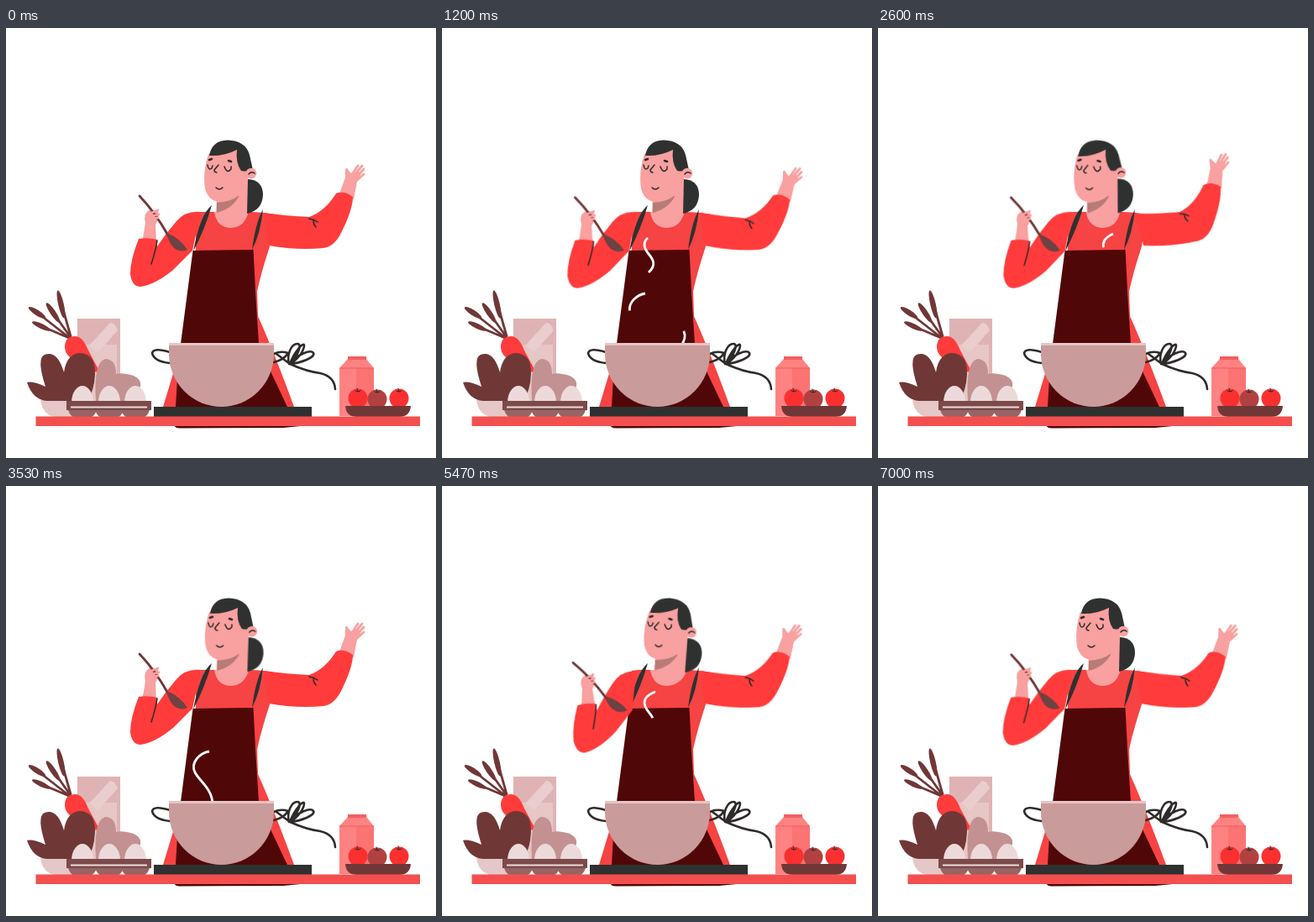
Animation of 512 by 512 pixels, one loop 7.03 s. Source, as an HTML page without scripts:

```html
<!DOCTYPE html>
<html lang="en">
<head>
<meta charset="utf-8">
<title>Cooking</title>
<style>
html, body { margin: 0; width: 100%; height: 100%; overflow: hidden; background: #fff; }
svg { display: block; width: 100%; height: 100%; }

.red { fill: #ff3b3b; }
.dress { fill: #f64343; }
.skin { fill: #f9a0a0; }
.ink { fill: #2f3130; }
.plum { fill: #703737; }
.apron { fill: #500708; }
.line, .finger, .stem { fill: none; stroke-linecap: round; stroke-linejoin: round; }
.line { stroke: #2f2b2b; stroke-width: 1.5; }
.bold { stroke-width: 2.6; }
.fine { stroke-width: 1; }
.finger { stroke: #f9a0a0; stroke-width: 2.8; }
.stem { stroke: #703737; stroke-width: 2.8; }

.head, .spoon, .wave { animation: 7.03s cubic-bezier(.37, 0, .63, 1) infinite; }
.head { transform-origin: 268px 267px; animation-name: sway; }
.spoon { transform-origin: 240px 229px; animation-name: stir; }
.wave { transform-origin: 315px 235px; animation-name: wave; }

@keyframes sway {
  0%, 3.84% { transform: rotate(0deg); }
  9.53% { transform: rotate(-2.9deg); }
  24.6% { transform: rotate(2.9deg); }
  41.96% { transform: rotate(-2.9deg); }
  56.9% { transform: rotate(2.9deg); }
  68.4% { transform: rotate(-1.6deg); }
  77.8% { transform: rotate(2.9deg); }
  90.3% { transform: rotate(-2deg); }
  99.57%, 100% { transform: rotate(0deg); }
}
@keyframes stir {
  0%, 3.84%, 18.92%, 34.85%, 50.2%, 66.43%, 85.3%, 100% { transform: rotate(0deg); }
  12.2%, 27.28%, 42.5%, 58.3%, 77.8%, 92.5% { transform: rotate(-7.2deg); }
  99.57% { transform: rotate(-.6deg); }
}
@keyframes wave {
  0%, 3.84%, 50.2%, 100% { transform: rotate(0deg); }
  9.53% { transform: rotate(-9.2deg); }
  17.8% { transform: rotate(2deg); }
  32.1%, 58.3%, 88.9% { transform: rotate(-9deg); }
  66.43% { transform: rotate(2.3deg); }
  72.1% { transform: rotate(-5deg); }
  77.8%, 99.57% { transform: rotate(1.2deg); }
}

/* each wisp draws in from below, then erases upward */
.steam use {
  fill: none; stroke: #fff; stroke-width: 2.8;
  stroke-dasharray: 100 250; stroke-dashoffset: 101;
  animation: rise 7.03s linear var(--at, 0s) infinite;
}
.steam .first { animation-name: puff; }
@keyframes rise {
  0% { stroke-dashoffset: 101; }
  21%, 100% { stroke-dashoffset: -101; }
}
@keyframes puff {
  0%, 3.84% { stroke-dashoffset: 101; }
  9.53% { stroke-dashoffset: 15; }
  21%, 100% { stroke-dashoffset: -101; }
}
</style>
</head>
<body>
<svg viewBox="0 0 512 512">
  <defs>
    <path id="left" pathLength="100" d="M246 378C245 360 230 351 225 341C219 329 231 318 242 316"/>
    <path id="upper" pathLength="100" d="M246 291C256 282 251 275 246 269Q233 253 254 245"/>
    <path id="right" pathLength="100" d="M275 366C286 354 281 346 272 336Q257 317 284 304"/>
    <path id="top" pathLength="100" d="M275 295C282 287 280 277 274 271Q260 254 280 245"/>
    <path id="egg" d="M-13 9C-13-4-6-11 0-11S13-4 13 9Z" fill="#ecdada"/>
    <path id="cup" d="M-17 0H17Q14 9 7 9H-7Q-14 9-17 0Z" fill="#966464"/>
    <g id="tomato">
      <circle r="11.5"/>
      <path class="line fine" d="M-3-9L0-8L3-9M0-8L-1-12"/>
    </g>
  </defs>

  <!-- body -->
  <path class="dress" d="M226 220Q236 218 248 219H290Q304 219 320 222L314 260Q303 294 299 314L300 343Q320 388 343 451H187L204 395L214 366L226 262Z"/>
  <path class="apron" d="M222.500 265L294.500 264Q297 320 301 376L316 411L335 451H202L205 400L208 376ZM200 472Q201 477 208 476.500L330 476L351 474V472Z"/>

  <!-- waving arm -->
  <g class="wave">
    <path class="skin" d="M396 200L404 178L404 168Q406 165 408 170L411 173L420 171L423 178L418 183L414 204Z"/>
    <path class="finger" d="M411 176L419 164M414 176L424 164M417 178L426 168M418 181L426 174M407 180L405.500 169"/>
    <path class="red" d="M307 220Q335 224 361 225Q380 218 393 197Q402 193 413 201Q413 216 399 244Q391 260 378 262Q346 265 313 259Z"/>
    <path class="line" d="M361 227Q367 228 371 231M366 230Q366 234 369 237"/>
  </g>

  <path class="skin" d="M248 219Q251 238 268 238Q285 237 288 219Z"/>

  <!-- head -->
  <g class="head">
    <path class="skin" d="M251 200H288V222Q282 236 268 236Q252 235 250 221Z"/>
    <path d="M251 208Q268 207 279 197Q271 215 251 220Z" fill="#b77c76"/>
    <path class="skin" d="M241 150Q234 172 237 191Q241 207 256 207Q269 206 276 200L288 202V150Q265 138 241 150Z"/>
    <path class="ink" d="M288 180Q306 181 306 199Q305 217 287 221Z"/>
    <path class="ink" d="M242 152Q245 134 264 133.500Q285 134 290 151L293.500 167Q289 172 280 170Q273 160 275 145Q259 153 242 152Z"/>
    <circle class="skin" cx="292" cy="173" r="6.300"/>
    <path class="line" d="M289 174Q292 170 296 173"/>
    <path class="line bold" d="M242 157L245 156M265 158L268 159"/>
    <path class="line" d="M240 163Q241 170 245 167L246 164M260 165Q263 174 268 168L268 165"/>
    <path class="line" d="M253 163L248 169Q248 172 251 172M250 190Q254 194 258 190"/>
  </g>

  <path class="ink" d="M245 211Q231 222 223 266Q237 239 245 211ZM306 216Q297 232 293 264Q303 245 306 216Z"/>

  <!-- stirring arm -->
  <g class="spoon">
    <path class="skin" d="M162 256L166 232Q163 220 171 217L181 217L182 227L178 234L179 256Z"/>
    <path class="red" d="M232 219Q214 217 203 230Q190 245 180 260V252Q168 249 158 251Q148 276 148 293Q150 308 160 308Q177 306 199 288L222 265Z"/>
    <path class="line" d="M180 253Q179 262 173 281"/>
    <path class="stem" d="M159 200Q178 220 193 247"/>
    <path d="M191 244Q207 250 216 264Q211 267 203 264Q195 260 191 244Z" fill="#6d4242"/>
    <path class="finger" d="M171 221L181 217M172 224L182 222M172 227L181 226"/>
  </g>

  <!-- steam -->
  <g class="steam">
    <use href="#left" class="first"/>
    <use href="#left" style="--at:2.79s"/>
    <use href="#upper" style="--at:.595s"/>
    <use href="#upper" style="--at:4.52s"/>
    <use href="#right" x="8" y="14" style="--at:.99s"/>
    <use href="#right" style="--at:3.93s"/>
    <use href="#top" style="--at:1.4s"/>
  </g>

  <!-- apron ties -->
  <path class="line bold" d="M195 386Q176 380 174 387Q176 397 195 399M319 388Q327 384 336 387Q331 395 319 398M337 400C334 388 340 376 347 376S346 393 337 400M338 400C344 384 355 373 355 378S349 394 338 400M338 400C346 389 363 382 366 387S351 399 338 400M322 388L338 400Q358 409 374 411Q391 415 392 430"/>

  <!-- pot and stove -->
  <path d="M194 377V388A62.500 63 0 0 0 319 388V377Z" fill="#ca9b9b"/>
  <path d="M194 375H319V378H194Z" fill="#e6c6c6"/>
  <path class="ink" d="M176 451H364V463H176Z"/>

  <!-- vegetables and eggs -->
  <path d="M85 346H136V447H85Z" fill="#dfb3b3"/>
  <path d="M90 377H132V447H90Z" fill="#e7c6c6"/>
  <path d="M99 378L124 351Q130 351 133 360L110 386Z" fill="#eacdcd"/>
  <path class="stem" d="M77 370L36 338M75 369L42 355M76 367L54 336M77 367L66 328"/>
  <g class="plum">
    <ellipse cx="37" cy="339" rx="12" ry="3.300" transform="rotate(33 37 339)"/>
    <ellipse cx="42" cy="355" rx="12" ry="3" transform="rotate(25 42 355)"/>
    <ellipse cx="56" cy="339" rx="14" ry="3.300" transform="rotate(56 56 339)"/>
    <ellipse cx="65.500" cy="329" rx="17" ry="3.300" transform="rotate(77 65.500 329)"/>
  </g>
  <path class="red" d="M70 380Q70 367 83 367Q92 368 98 384L112 410L92 408L73 389Q70 385 70 380Z"/>
  <path d="M107 444Q104 398 118 394Q131 394 131 412Q138 410 152 414Q162 419 160 427L142 444Z" fill="#c39191"/>
  <path d="M41 443H80V463H57Q43 459 41 443Z" fill="#e5c7c7"/>
  <path class="plum" d="M49 444Q32 443 25 422Q31 420 47 427Q36 393 46 389Q61 383 69 410Q72 388 88 387Q107 388 106 412Q105 432 97 444Z"/>
  <use href="#egg" x="91" y="437"/>
  <use href="#egg" x="123" y="437"/>
  <use href="#egg" x="154" y="437"/>
  <path d="M72 444H173V455H72Z" fill="#7c4a4a"/>
  <path d="M77 450.500H168V452.500H77Z" fill="#ecdada"/>
  <use href="#cup" x="91" y="455"/>
  <use href="#cup" x="123" y="455"/>
  <use href="#cup" x="154" y="455"/>

  <!-- milk and tomatoes -->
  <path d="M397 405L407 394H429L438 405V462H397Z" fill="#ff8282"/>
  <path d="M417 405H438V462H417Z" fill="#fb7373"/>
  <path d="M407 391H429V395H407ZM397 404.500H438V405.500H397Z" fill="#f45f5f"/>
  <use href="#tomato" x="419" y="441" fill="#fa3030"/>
  <use href="#tomato" x="442" y="442" fill="#b14141"/>
  <use href="#tomato" x="468" y="441" fill="#fa3030"/>
  <path class="plum" d="M404 450H482Q481 463 468 463H418Q405 463 404 450Z"/>

  <path d="M35.500 462.500H493V474H35.500Z" fill="#f44f4f"/>
</svg>
</body>
</html>
```
